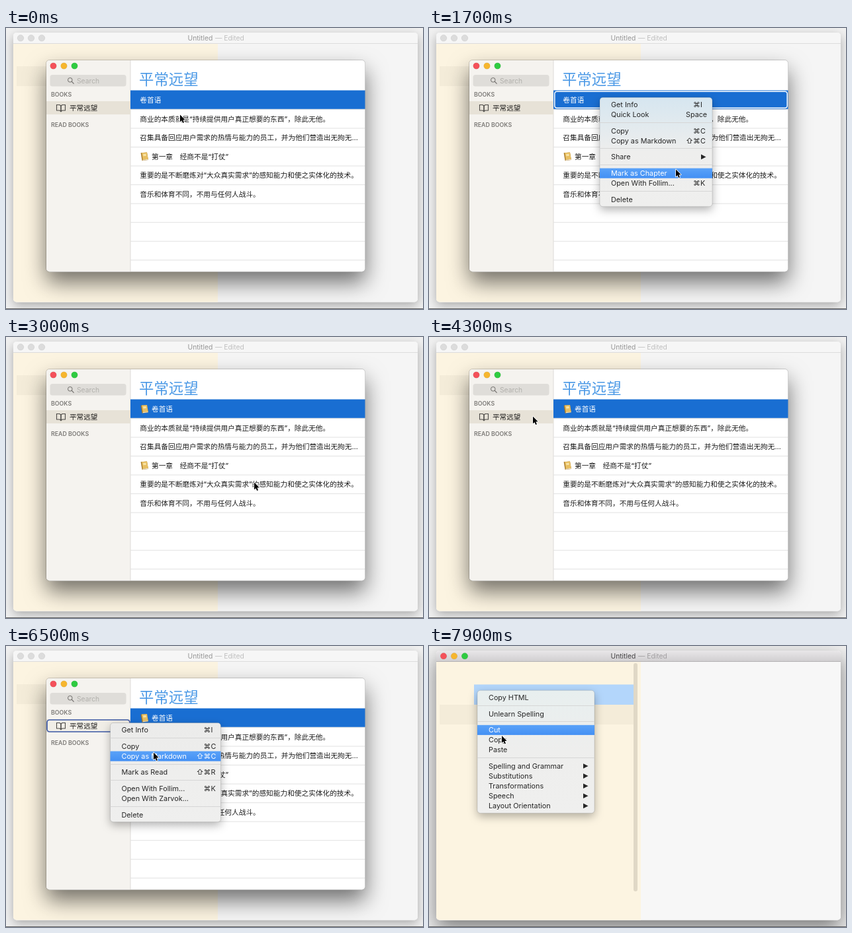
These frames come from a looping animation (630 by 426 pixels, 8 s). An HTML page with a canvas:

```html
<!DOCTYPE html>
<html lang="zh-CN">
<head>
<meta charset="utf-8">
<style>
html, body { margin: 0; width: 100%; height: 100%; overflow: hidden; background: #f1f1f1; }
canvas { display: block; }
</style>
</head>
<body>
<canvas width="630" height="426"></canvas>
<script>
const LOOP = 8000, STEP = 100, ROW = 28.55, HOVER_LAG = 15;
const ctx = document.querySelector('canvas').getContext('2d');
const FONT = 'Inter, "Noto Sans CJK SC", "Noto Sans CJK", "DejaVu Sans", sans-serif';
const BOOK = '平常远望';

const LINES = [
  '卷首语',
  '商业的本质就是“持续提供用户真正想要的东西”，除此无他。',
  '召集具备回应用户需求的热情与能力的员工，并为他们营造出无拘无…',
  '第一章　经商不是“打仗”',
  '重要的是不断磨炼对“大众真实需求”的感知能力和使之实体化的技术。',
  '音乐和体育不同，不用与任何人战斗。'
];

// Items are [label, shortcut]; '>' opens a submenu and null is a separator.
const MENUS = [
  { x: 258, y: 105.3, w: 170, tint: '#d6e6f0', open: 1100, blink: 2200, end: 2600, items: [
    ['Get Info', '⌘I'], ['Quick Look', 'Space'], null,
    ['Copy', '⌘C'], ['Copy as Markdown', '⇧⌘C'], null,
    ['Share', '>'], null,
    ['Mark as Chapter'], ['Open With Follim...', '⌘K'], null, ['Delete']] },
  { x: 157.5, y: 116.5, w: 167, tint: '#ebebea', open: 4900, blink: 6400, end: 6800, items: [
    ['Get Info', '⌘I'], null,
    ['Copy', '⌘C'], ['Copy as Markdown', '⇧⌘C'], null,
    ['Mark as Read', '⇧⌘R'], null,
    ['Open With Follim...', '⌘K'], ['Open With Zarvok...'], null, ['Delete']] },
  { x: 73, y: 67.3, w: 177, tint: '#e8efef', open: 7800, blink: 9000, end: 9400, items: [
    ['Copy HTML'], null, ['Unlearn Spelling'], null,
    ['Cut'], ['Copy'], ['Paste'], null,
    ['Spelling and Grammar', '>'], ['Substitutions', '>'], ['Transformations', '>'],
    ['Speech', '>'], ['Layout Orientation', '>']] }
];

// Pointer stops: [time, x, y]
const STOPS = [
  [0, 263, 131], [700, 263, 131], [1000, 258.5, 106], [1100, 258.5, 106],
  [1700, 373, 214], [2000, 375, 220], [3000, 375, 220], [3800, 154, 121],
  [4000, 157, 120], [4900, 157, 120], [5700, 217, 175], [5900, 223, 161],
  [6600, 223, 161], [7200, 50, 79], [7400, 48, 67], [7500, 48, 67],
  [7600, 72, 67], [7800, 72, 67], [7900, 110, 135.5], [8000, 110, 135.5]
];

function pointerAt(t) {
  const i = STOPS.findIndex((s, n) => n && t <= s[0]);
  const [t0, x0, y0] = STOPS[i - 1], [t1, x1, y1] = STOPS[i];
  const p = (t - t0) / (t1 - t0), e = p * p * (3 - 2 * p);
  return { x: x0 + (x1 - x0) * e, y: y0 + (y1 - y0) * e };
}

function box(x, y, w, h, r, fill, stroke, width = 1) {
  ctx.beginPath();
  ctx.roundRect(x, y, w, h, r);
  if (fill) { ctx.fillStyle = fill; ctx.fill(); }
  if (stroke) { ctx.strokeStyle = stroke; ctx.lineWidth = width; ctx.stroke(); }
}

function shadowBox(x, y, w, h, r, fill, offset, blur, alpha) {
  ctx.save();
  ctx.shadowColor = `rgba(0,0,0,${alpha})`;
  ctx.shadowOffsetY = offset;
  ctx.shadowBlur = blur;
  box(x, y, w, h, r, fill);
  ctx.restore();
}

function gradient(y0, y1, ...colors) {
  const g = ctx.createLinearGradient(0, y0, 0, y1);
  colors.forEach((c, i) => g.addColorStop(i / (colors.length - 1), c));
  return g;
}

// y is the vertical centre of the capitals
function text(str, x, y, size, color, weight = 400) {
  ctx.font = `${weight} ${size}px ${FONT}`;
  ctx.fillStyle = color;
  ctx.fillText(str, x, y + size * 0.37);
}

function path(points, { fill, stroke, width = 1, close = true }) {
  ctx.beginPath();
  points.forEach(([x, y]) => ctx.lineTo(x, y));
  if (close) ctx.closePath();
  if (stroke) { ctx.strokeStyle = stroke; ctx.lineWidth = width; ctx.stroke(); }
  if (fill) { ctx.fillStyle = fill; ctx.fill(); }
}

function lights(x, y, colors) {
  colors.forEach((c, i) => box(x + i * 16 - 4.8, y - 4.8, 9.6, 9.6, 4.8, c, 'rgba(0,0,0,.09)', 0.7));
}

const LIGHTS = ['#f4515a', '#f6b62e', '#2fcb41'];

function editor(active, selected) {
  ctx.fillStyle = '#f1f1f1';
  ctx.fillRect(0, 0, 630, 426);
  shadowBox(11, 7, 611, 408.5, 5, '#f7f7f7', active ? 12 : 5, active ? 30 : 16, active ? 0.5 : 0.3);
  ctx.save();
  box(11, 7, 611, 408.5, 5);
  ctx.clip();
  ctx.fillStyle = active ? '#f7f7f7' : '#f5f5f5';
  ctx.fillRect(11, 7, 611, 409);
  ctx.fillStyle = '#fcf4e1';
  ctx.fillRect(11, 23, 309, 393);
  ctx.fillStyle = active ? gradient(7, 23, '#e9e7e9', '#d1cfd1') : '#f6f6f6';
  ctx.fillRect(11, 7, 611, 16);
  ctx.fillStyle = active ? '#b4b2b4' : '#dcdcdc';
  ctx.fillRect(11, 23, 611, 1);
  ctx.restore();
  lights(22, 15.3, active ? LIGHTS : ['#dcdcdc', '#dcdcdc', '#dcdcdc']);
  text('Untitled', 274.5, 15.5, 10.3, active ? '#454345' : '#969696');
  text('— Edited', 316, 15.5, 10.3, active ? '#a09ea0' : '#bfbfbf');
  ctx.fillStyle = '#f4ecd9';
  ctx.fillRect(16, selected ? 89 : 58, 295, 30);
  if (selected) {
    ctx.fillStyle = '#b3d6fb';
    ctx.fillRect(68, 58.4, 243, 30.6);
    box(309, 26, 6, 346, 3, '#e0d8c6');
  }
  ctx.fillStyle = '#626262';
  ctx.fillRect(0, 425, 630, 1);
}

function chapterIcon(y) {
  path([[203.6, y - 5.6], [213, y - 6.4], [215, y + 5], [205.6, y + 6.4]], { fill: '#a97b2b' });
  path([[205, y - 5.7], [213, y - 6.4], [214.7, y + 4], [206.8, y + 5]], { fill: '#e8bf62' });
  path([[207, y - 3.8], [211.4, y - 4.2], [212, y - 1.2], [207.6, y - 0.7]], { fill: '#f8e3a6' });
  path([[206.6, y + 5.4], [214.7, y + 4.4]], { stroke: '#f4ecd9', close: false });
}

function sidebar(ring) {
  ctx.fillStyle = '#f5f3ef';
  ctx.fillRect(61, 49, 127, 321);
  ctx.fillStyle = '#dddbd7';
  ctx.fillRect(187.5, 49, 1, 321);
  lights(71.5, 57.5, LIGHTS);
  box(66.5, 71, 115, 17.5, 3.5, '#dfddd9');
  box(93.5, 75.5, 6.6, 6.6, 3.3, null, '#6f6d6a');
  path([[99.2, 81.2], [102.6, 84.6]], { stroke: '#6f6d6a', width: 1.2, close: false });
  text('Search', 107, 80, 10.3, '#b2b0ac');
  text('BOOKS', 68, 101, 8.8, '#7c7a77', 600);
  text('READ BOOKS', 68, 147, 8.8, '#7c7a77', 600);
  ctx.fillStyle = '#e7e2d7';
  ctx.fillRect(61, 111, 127, 20);
  if (ring) box(62, 112, 125, 18, 4, '#f1eee7', '#3d59a8', 1.7);
  for (const side of [-1, 1]) {
    path([[83, 118], [83 + side * 2, 116.5], [83 + side * 6.5, 116.5], [83 + side * 6.5, 125],
      [83 + side * 2, 125], [83, 126.5]], { stroke: '#4c4a47', width: 1.1 });
  }
  text(BOOK, 96, 121.3, 10.6, '#1d1c1b', 500);
}

function library(chapter, rowRing, bookRing) {
  shadowBox(61, 49, 481.5, 320.5, 5, '#fff', 16, 33, 0.55);
  ctx.save();
  box(61, 49, 481.5, 320.5, 5);
  ctx.clip();
  ctx.fillStyle = '#fff';
  ctx.fillRect(61, 49, 482, 321);
  sidebar(bookRing);
  text(BOOK, 201, 77.5, 22.4, '#4b99e6');
  ctx.fillStyle = '#e1e1e1';
  for (let i = 1; i < 10; i++) ctx.fillRect(188, 94.4 + i * ROW, 355, 1);
  ctx.fillStyle = '#196ed2';
  ctx.fillRect(188, 94.5, 355, 28.3);
  if (rowRing) box(189.8, 96.3, 351.4, 24.9, 3.5, null, '#fff', 1.5);
  LINES.forEach((line, i) => {
    const y = 109.3 + i * ROW, marked = i === 3 || (i === 0 && chapter);
    if (marked) chapterIcon(y);
    text(line, marked ? 220 : 202.3, y, 10.68, i ? '#1c1c1c' : '#fff');
  });
  ctx.restore();
  box(60.5, 48.5, 482, 321, 5, null, 'rgba(0,0,0,.15)');
}

function shortcut(key, x, y, color) {
  if (key === '>') {
    path([[x + 151, y - 3.8], [x + 158.5, y], [x + 151, y + 3.8]], { fill: color });
  } else if (key === 'Space') {
    text(key, x + 130, y, 10.8, color);
  } else {
    const at = key.indexOf('⌘');
    if (at) text(key.slice(0, at), x + 130, y, 10.8, color);
    text('⌘', x + 141, y, 10.8, color);
    text(key.slice(at + 1), x + 152, y, 10.8, color);
  }
}

function menu({ x, y, w, tint, open, blink, end, items }, t, hover) {
  if (t < open || t >= end) return;
  const height = items.reduce((h, item) => h + (item ? 15.1 : 9.5), 6.6);
  ctx.save();
  ctx.globalAlpha = t < blink + 200 ? 1 : (end - t) / 300;
  shadowBox(x, y, w, height, 4.5, gradient(y, y + height, tint, '#eeeeed', '#efefee'), 5, 14, 0.3);
  box(x, y, w, height, 4.5, null, 'rgba(0,0,0,.16)', 0.8);
  let top = y + 3.3;
  for (const item of items) {
    if (!item) {
      ctx.fillStyle = '#d6d6d6';
      ctx.fillRect(x, Math.round(top + 4), w, 1);
      top += 9.5;
      continue;
    }
    const [label, key] = item, mid = top + 7.4;
    const hot = t > open && t !== blink && hover.x > x && hover.y >= top - 1 && hover.y < top + 14.1;
    if (hot) {
      ctx.fillStyle = gradient(top, top + 15, '#5aa2f8', '#4390f4');
      ctx.fillRect(x, top, w, 15.1);
    }
    const color = hot ? '#fff' : '#262626';
    text(label, x + 17, mid, 10.8, color);
    if (key) shortcut(key, key === '>' ? x + w - 168 : x, mid, color);
    top += 15.1;
  }
  ctx.restore();
}

function cursor({ x, y }) {
  ctx.save();
  ctx.translate(x, y + 0.5);
  ctx.scale(0.92, 0.92);
  ctx.lineJoin = 'round';
  path([[0, 0], [0, 11.8], [2.7, 9.4], [4.5, 13.6], [6.5, 12.8], [4.7, 8.7], [8.3, 8.5]],
    { fill: '#000', stroke: '#fff', width: 1.8 });
  ctx.restore();
}

function draw(now) {
  const t = Math.floor(now % LOOP / STEP) * STEP;
  // Highlights trail the pointer slightly.
  const hover = pointerAt(Math.max(0, t - HOVER_LAG)), editing = t >= 7600;
  editor(editing, t >= 7800);
  if (!editing) library(t >= 2400, t >= 1100 && t < 2400, t >= 4800 && t < 6600);
  MENUS.forEach(m => menu(m, t, hover));
  cursor(pointerAt(t));
}

const start = performance.now();
function frame() {
  draw(performance.now() - start);
  requestAnimationFrame(frame);
}
frame();
</script>
</body>
</html>
```
